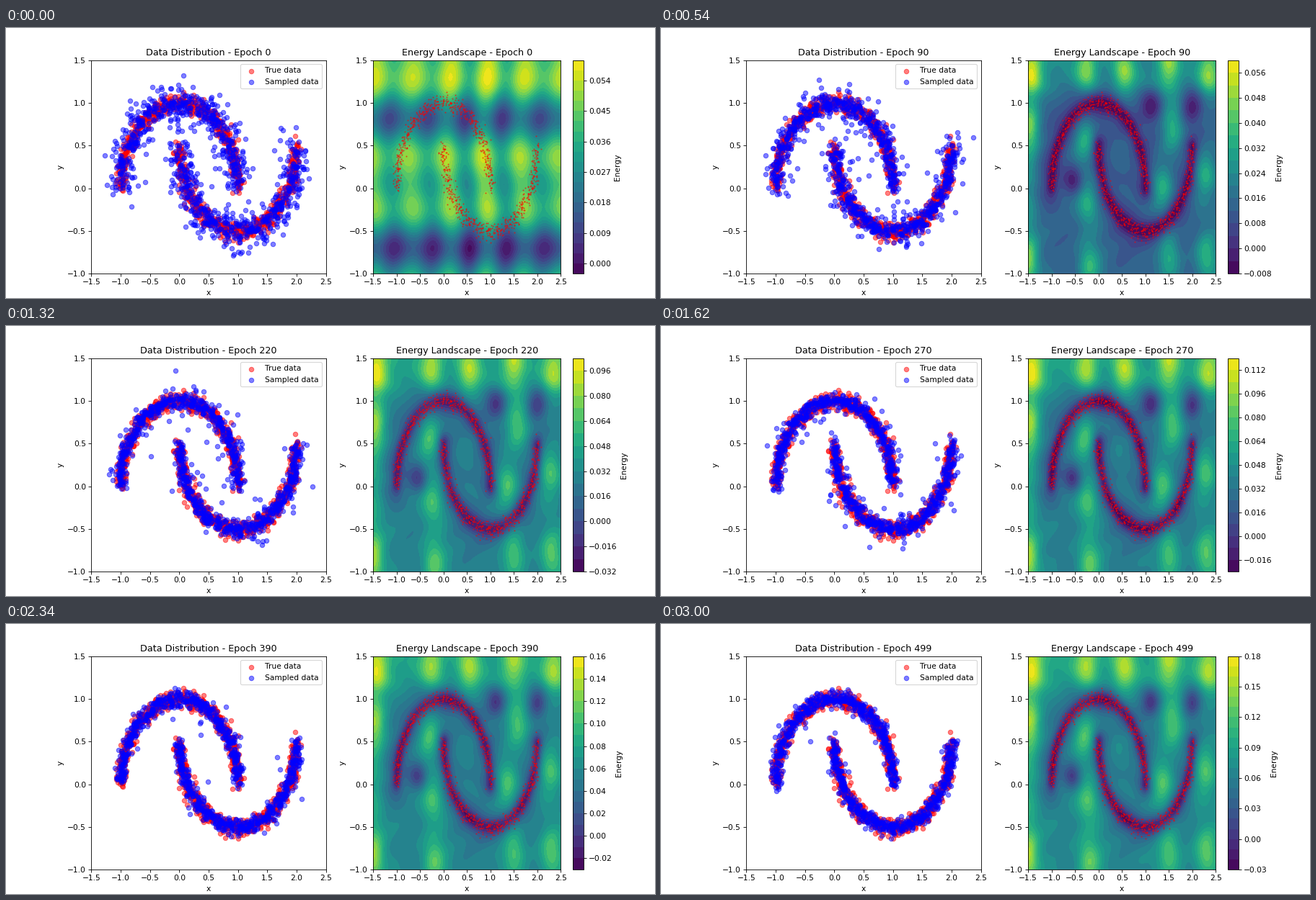
A matplotlib script for the animation above (3.06 s loop, 900x375 px).

```python
import numpy as np
import matplotlib.pyplot as plt
from matplotlib.animation import FuncAnimation

W, H, DPI = 900, 375, 76.8
FRAMES, INTERVAL = 51, 60
N = 500  # points per moon

# Energy range at key steps of the training
KEYS = [0, 9, 16, 32, 50]
LOW = [-.001, -.0075, -.026, -.022, -.026]
HIGH = [.059, .058, .082, .137, .176]

# Centres of the high and low spots that training leaves behind
HILLS = [(-1.4, 1.35), (-1.45, .7), (-1.5, -.85), (-.25, 1.4), (.55, 1.35),
         (1.5, 1.45), (2.35, 1.35), (1.57, .73), (1.37, -.02), (-.23, -.15),
         (-.28, .57), (2.27, .15), (1.5, -.78), (2.3, -.8), (-.2, -.9)]
PITS = [(1.12, .96), (2, .95), (-.55, .1)]


def moons(rng, noise):
    a = np.linspace(0, np.pi, N)
    x = np.r_[np.cos(a), 1 - np.cos(a)]
    y = np.r_[np.sin(a), .5 - np.sin(a)]
    return np.c_[x, y] + rng.normal(0, 1, (2 * N, 2)) * noise


def unit(z):
    return (z - z.min()) / (z.max() - z.min())


def bell(d, width):
    return np.exp(-(d / width) ** 2 / 2)


def spots(centres, sx, sy):
    return sum(bell(X - x, sx) * bell(Y - y, sy) for x, y in centres)


def start_field():
    """Wavy rows crossed by regular columns."""
    a = 2 * np.pi * (Y - .06) / 1.52
    rows = .13 * np.cos(a) - .09 * np.cos(2 * a) + .05 * Y
    columns = np.cos(2 * np.pi * (X - .1) / .8 + .5 * np.sin(3 * Y))
    return unit(rows + .09 * columns * (1 + .3 * np.sin(2 * X)))


def trained_field():
    """Valleys along both moons, hills away from them."""
    curve = moons(np.random.default_rng(0), 0)[::5]
    gap = np.min([np.hypot(X - x, Y - y) for x, y in curve], axis=0)
    valley = .22 * bell(gap, .07) + .12 * bell(gap, .17)
    rim = .1 / (1 + np.exp((1.15 - Y) / .05)) + .1 * bell(X + 1.5, .14)
    ripple = .03 * np.sin(6 * X + 2 * np.sin(5 * Y)) * np.cos(7 * Y - X)
    hills = .22 * spots(HILLS, .16, .2)
    return unit(hills + rim + ripple - valley - .24 * spots(PITS, .15, .13))


X, Y = np.meshgrid(np.linspace(-1.5, 2.5, 100), np.linspace(-1, 1.5, 100))
start, trained = start_field(), trained_field()


def energy(k):
    lo, hi = np.interp(k, KEYS, LOW), np.interp(k, KEYS, HIGH)
    old = np.exp(-k / 2.5)
    power = 1 + .9 * np.exp(-k / 13)
    return lo + (hi - lo) * unit(old * start + (1 - old) * trained ** power)


def samples(k):
    rng = np.random.default_rng(100 + k)
    stray = rng.random((2 * N, 1)) < .03 + .75 * np.exp(-k / 13)
    return moons(rng, np.where(stray, .13, .045))


fig = plt.figure(figsize=(W / DPI, H / DPI), dpi=DPI)


def panel(x, w):
    return fig.add_axes([x / W, 34 / H, w / W, 296.2 / H])


left, right = panel(118.4, 325.2), panel(509.1, 260.2)
for ax in (left, right):
    ax.set(xlim=(-1.5, 2.5), ylim=(-1, 1.5), xlabel="x", ylabel="y")
    ax.set_xticks(np.arange(-1.5, 2.6, .5))

true = moons(np.random.default_rng(42), .05)
left.scatter(*true.T, c="red", alpha=.5, label="True data")
cloud = left.scatter(*samples(0).T, c="blue", alpha=.5, label="Sampled data")
left.legend(loc="upper right")
right.scatter(*true.T, c="red", s=1, alpha=.5, zorder=2)

live = []  # artists rebuilt on every step


def draw(k):
    while live:
        live.pop().remove()
    epoch = min(10 * k, 499)
    left.set_title(f"Data Distribution - Epoch {epoch}")
    right.set_title(f"Energy Landscape - Epoch {epoch}")
    cloud.set_offsets(samples(k))
    fill = right.contourf(X, Y, energy(k), levels=20, cmap="viridis")
    cax = panel(785.9, 14.8)
    fig.colorbar(fill, cax=cax, label="Energy")
    live.extend([fill, cax])


anim = FuncAnimation(fig, draw, frames=FRAMES, interval=INTERVAL,
                     init_func=lambda: None, repeat=True, repeat_delay=0)
plt.show()
```
